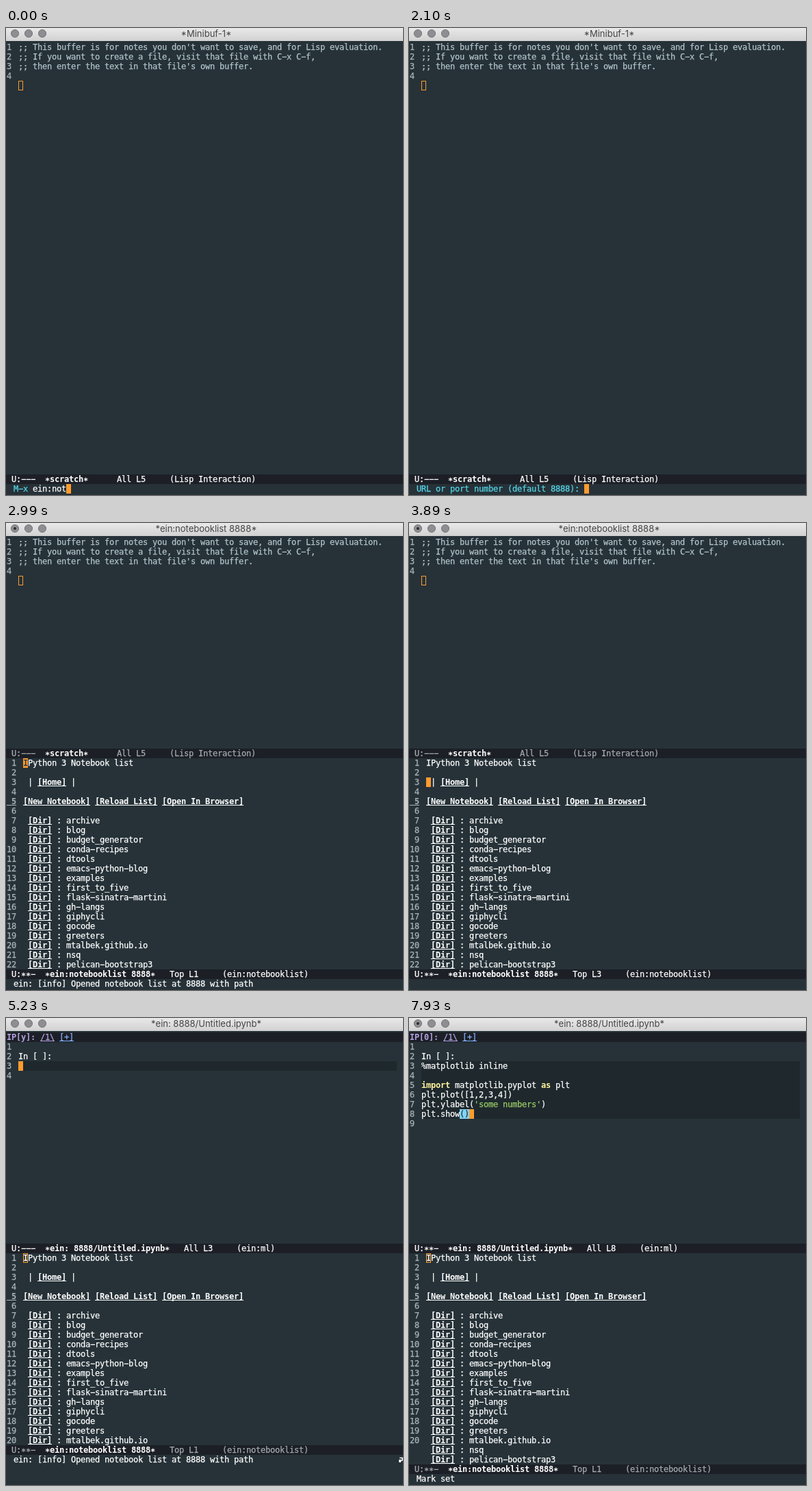
These frames come from a looping animation (580 px wide and 681 px high, 8 s). An HTML page with a canvas:

```html
<!DOCTYPE html>
<html lang="en">
<head>
<meta charset="utf-8">
<title>Notebook in an editor</title>
<style>
html, body { margin: 0; width: 580px; height: 681px; overflow: hidden; background: #263238; }
canvas { display: block; }
</style>
</head>
<body>
<canvas id="stage" width="580" height="681"></canvas>
<script>
const ctx = document.getElementById('stage').getContext('2d');
const LOOP = 8000, CELL = 7, ROW = 14;
const C = {
  bg: '#263238', bar: '#1c1f26', cell: '#1e282d', white: '#ffffff', dim: '#a3abb0',
  number: '#a9b5ba', comment: '#b2c4cb', orange: '#ff9b30', cyan: '#55d5e8',
  keyword: '#fff59d', string: '#9ccc65', match: '#81d4fa', purple: '#b3a1e0', blue: '#82b1ff'
};
// Wide dashes and centred stars suit the terminal face.
const GLYPHS = { '-': '\u2212', '*': '\u2217' };

const SCRATCH = [
  ";; This buffer is for notes you don't want to save, and for Lisp evaluation.",
  ';; If you want to create a file, visit that file with C-x C-f,',
  ";; then enter the text in that file's own buffer.",
  ''
];
const DIRS = ('archive blog budget_generator conda-recipes dtools emacs-python-blog examples ' +
  'first_to_five flask-sinatra-martini gh-langs giphycli gocode greeters ' +
  'mtalbek.github.io nsq pelican-bootstrap3').split(' ');
const LIST = [
  'IPython 3 Notebook list', '', ' | [Home] |', '',
  '[New Notebook] [Reload List] [Open In Browser]', '',
  ...DIRS.map(dir => ' [Dir] : ' + dir)
];
const LIST_TITLE = '*ein:notebooklist 8888*';
const NOTEBOOK_TITLE = '*ein: 8888/Untitled.ipynb*';
const OPENED = 'ein: [info] Opened notebook list at 8888 with path';

function rect(x, y, w, h, color) {
  ctx.fillStyle = color;
  ctx.fillRect(x, y, w, h);
}

// Draws text on the character grid and returns the x after it.
function put(text, x, y, color, { bold = false, underline = false } = {}) {
  ctx.font = (bold ? 'bold ' : '') + '12px "DejaVu Sans Mono", monospace';
  ctx.textAlign = 'left';
  ctx.fillStyle = ctx.strokeStyle = color;
  ctx.lineWidth = 0.25;
  [...text].forEach((ch, i) => {
    const glyph = GLYPHS[ch] || ch;
    ctx.fillText(glyph, x + i * CELL, y + 11);
    if (!bold) ctx.strokeText(glyph, x + i * CELL, y + 11);
  });
  const end = x + text.length * CELL;
  if (underline) rect(x, y + 12, end - x, 1, color);
  return end;
}

function putParts(parts, x, y) {
  for (const [text, color, style] of parts) x = put(text, x, y, color, style);
}

function cursor(x, y, ch = '') {
  rect(x, y, CELL, ROW, C.orange);
  put(ch, x, y, C.bg);
}

function hollowCursor(x, y) {
  ctx.strokeStyle = C.orange;
  ctx.lineWidth = 1;
  ctx.strokeRect(x + 0.5, y + 0.5, CELL - 1, ROW - 1);
}

function titleBar(title, modified) {
  const shade = ctx.createLinearGradient(0, 0, 0, 19);
  shade.addColorStop(0, '#e9e9e9');
  shade.addColorStop(1, '#d1d1d1');
  rect(0, 0, 580, 19, shade);
  for (const x of [13, 33, 53]) {
    ctx.beginPath();
    ctx.arc(x, 8, 5.6, 0, Math.PI * 2);
    ctx.fillStyle = '#8e8d92';
    ctx.fill();
    ctx.strokeStyle = '#727177';
    ctx.lineWidth = 0.9;
    ctx.stroke();
  }
  if (modified) {
    ctx.beginPath();
    ctx.arc(13, 8, 2, 0, Math.PI * 2);
    ctx.fillStyle = '#2c2c2e';
    ctx.fill();
  }
  ctx.font = '13px Inter, sans-serif';
  ctx.textAlign = 'center';
  ctx.fillStyle = '#444444';
  ctx.fillText(title, 292.5, 13);
}

function modeLine(y, flags, buffer, position, mode, active) {
  const color = active ? C.white : C.dim;
  rect(0, y, 580, ROW, C.bar);
  putParts([
    [`U:${flags}  `, color],
    [buffer, C.white, { bold: true }],
    [position + '     ' + mode, color]
  ], 8, y);
}

function scratch(barY, active, solid) {
  SCRATCH.forEach((line, i) => {
    put(String(i + 1), 1, 21 + i * ROW, C.number);
    put(line, 18, 21 + i * ROW, C.comment);
  });
  (solid ? cursor : hollowCursor)(18, 77);
  modeLine(barY, '---', '*scratch*', '      All L5', '(Lisp Interaction)', active);
}

function notebookList({ rows = 22, numbers = rows, line = 1, col = 0, active = true, on = true }) {
  const rowY = n => 343 + (n - 1) * ROW;
  LIST.slice(0, rows).forEach((text, i) => {
    const n = i + 1, y = rowY(n), heavy = n === 5;
    if (n <= numbers) put(String(n).padStart(2), 1, y, C.number, { bold: heavy, underline: heavy });
    const parts = text.split(/(\[[^\]]+\])/).map(part => {
      const link = part[0] === '[';
      return [part, C.white, { bold: link, underline: link }];
    });
    putParts(parts, 25, y);
  });
  const x = 25 + col * CELL;
  if (!active) hollowCursor(x, rowY(line));
  else if (on) cursor(x, rowY(line), LIST[line - 1][col]);
  modeLine(343 + rows * ROW, '**-', LIST_TITLE, `   Top L${line}`, '(ein:notebooklist)', active);
}

function notebook(filled, on, matched) {
  const lines = filled ? 6 : 1;
  const rowY = n => 35 + (n - 1) * ROW;
  rect(0, 21, 580, ROW, C.bar);
  put(`IP[${filled ? 0 : 'y'}]:`, 1, 21, C.purple, { bold: true });
  put('/1\\', 50, 21, C.purple, { underline: true });
  put('[+]', 78, 21, C.blue, { underline: true });
  for (let n = 1; n <= lines + 3; n++) put(String(n), 1, rowY(n), C.number);
  put('In [ ]:', 18, rowY(2), C.white);
  rect(18, rowY(3), 553, lines * ROW, C.cell);
  if (filled) {
    const bold = { bold: true };
    if (matched) rect(74, rowY(8), 2 * CELL, ROW, C.match);
    const code = [
      [['%matplotlib inline', C.white]],
      [],
      [['import', C.keyword, bold], [' matplotlib.pyplot ', C.white], ['as', C.keyword, bold], [' plt', C.white]],
      [['plt.plot([1,2,3,4])', C.white]],
      [['plt.ylabel(', C.white], ["'some numbers'", C.string], [')', C.white]],
      [['plt.show', C.white], ['()', matched ? C.bg : C.white]]
    ];
    code.forEach((parts, i) => putParts(parts, 18, rowY(i + 3)));
  }
  if (on) filled ? cursor(88, rowY(8)) : cursor(18, rowY(3));
  modeLine(329, filled ? '**-' : '---', NOTEBOOK_TITLE, `   All L${filled ? 8 : 3}`, '(ein:ml)', true);
}

function continuationMark() {
  ctx.strokeStyle = C.white;
  ctx.lineWidth = 1.5;
  ctx.beginPath();
  ctx.moveTo(575, 641.5);
  ctx.lineTo(579, 641.5);
  ctx.lineTo(579, 645);
  ctx.lineTo(575, 646);
  ctx.stroke();
  rect(574, 644, 3, 4, C.white);
}

// Last entry whose start time has passed.
const at = (steps, t) => steps.filter(([start]) => t >= start).pop();

const COMMAND = 'ein:notebooklist-open';
const TYPED = [[0, 7], [300, 12], [750, 15], [900, 17], [1350, 18], [1650, 21]];
const MOVES = [[2990, 1, 0], [3590, 2, 0], [3890, 3, 0], [4040, 4, 0], [4190, 5, 0],
  [4340, 5, 1], [4490, 5, 2], [4790, 5, 3]];

function drawPrompt(t) {
  const waiting = t >= 2840;
  titleBar(waiting ? '*scratch*' : '*Minibuf-1*', false);
  scratch(651, true, waiting);
  if (waiting) return;
  if (t < 2100) {
    const x = put('M-x ', 11, 665, C.cyan);
    cursor(put(COMMAND.slice(0, at(TYPED, t)[1]), x, 665, C.white), 665);
  } else {
    const x = put('URL or port number (default 8888): ', 11, 665, C.cyan);
    if (t < 2550) cursor(x, 665);
  }
}

function drawList(t) {
  const [, line, col] = at(MOVES, t);
  titleBar(LIST_TITLE, true);
  scratch(329, false, false);
  notebookList({ line, col, on: t < 3440 || t >= 3590 });
  if (t < 3590) put(OPENED, 11, 665, C.white);
  if (t >= 5080) put('ein: [info] Opening notebook Untitled.ipynb...', 11, 665, C.white);
}

function drawNotebook(t) {
  const filled = t >= 6880;
  const on = filled ? t < 7480 || t >= 7930 : Math.floor((t - 5230) / 450) % 2 === 0;
  titleBar(NOTEBOOK_TITLE, filled);
  notebook(filled, on, t >= 7030);
  notebookList({ rows: filled ? 22 : 20, numbers: 20, active: false });
  if (filled) {
    put('Mark set', 11, 665, C.white);
  } else {
    put(OPENED, 11, 637, C.white);
    continuationMark();
  }
}

function draw(t) {
  rect(0, 0, 580, 681, C.bg);
  if (t < 2990) drawPrompt(t);
  else if (t < 5230) drawList(t);
  else drawNotebook(t);
}

let start;
function tick(now) {
  start ??= now;
  draw((now - start) % LOOP);
  requestAnimationFrame(tick);
}
draw(0);
requestAnimationFrame(tick);
</script>
</body>
</html>
```
